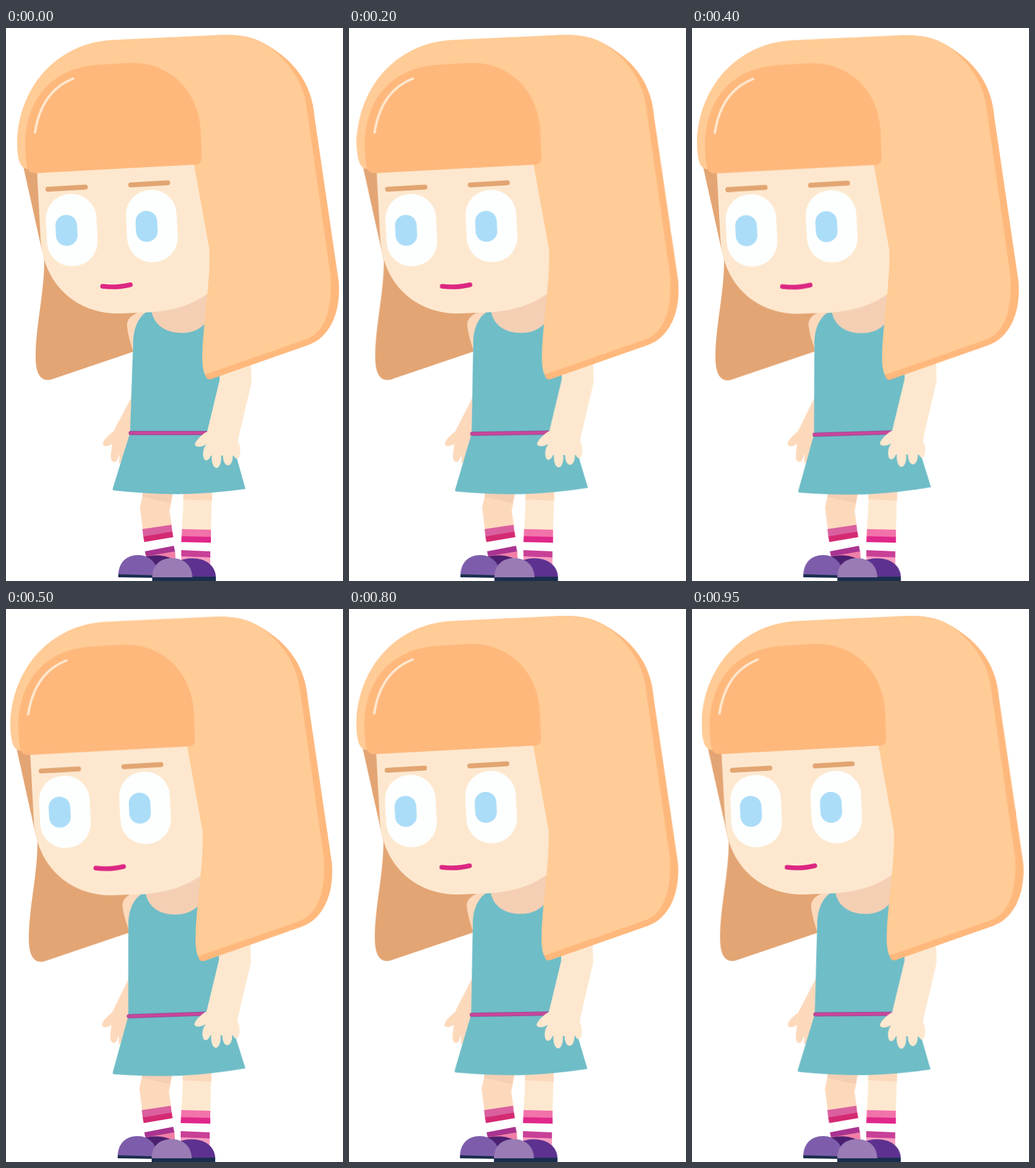
Animation of 546x895 px, one loop 1 s. Source, as an HTML page:

```html
<!DOCTYPE html>
<html lang="en">
<head>
<meta charset="utf-8">
<title>Girl swaying</title>
<style>
  html, body { margin: 0; width: 100%; height: 100%; overflow: hidden; background: #fff; }
  svg { display: block; width: 100%; height: 100%; }
  .skin { fill: #fde8cf; }
  .dim { fill: #fdd9bc; }
  .shade { fill: #f5cfb4; }
  .hair { fill: #ffcb96; }
  .fringe { fill: #ffb87c; }
  .back { fill: #e3a574; }
  .brow { stroke: #e2a572; stroke-width: 8; }
  .eye { fill: #fdfffe; }
  .iris { fill: #abddf8; }
  .line { fill: none; stroke-linecap: round; }
</style>
</head>
<body>
<svg viewBox="0 0 546 895">
  <g class="head">
    <path class="back" d="M28 224 L56 350 L62 376 C62 430 48 482 48 532 C48 558 55 573 73 569 L206 524 L310 489 L300 224 Z"/>
  </g>

  <g id="farArm" class="dim">
    <path d="M230 457 C208 460 196 468 196 482 C198 500 203 514 208 530 L214 590 L203 598 L174 653
      C166 659 157 667 157 673 C158 679 167 677 172 673 C172 680 169 690 170 697 C172 704 179 704 181 697 L184 690
      L183 705 L192 700 L240 600 L240 470 Z"/>
  </g>

  <g id="legs">
    <path class="dim" d="M222 740 L222 754 L217 776 L222 815 L269 808 L265 782 L271 750 Z"/>
    <path class="shade" d="M222 745 L221 759 L267 769 L271 745 Z"/>
    <path fill="#da5f9f" d="M221 811 L268 804 L269.500 816 L222.500 824 Z"/>
    <path fill="#d42a72" d="M222.500 823 L269.500 815 L271 824 L224 832 Z"/>
    <path fill="#a93490" d="M225 847 L272 838 L274 848 L227 856 Z"/>
    <path fill="#f07fa8" d="M227 855 L274 847 L275 865 L228 872 Z"/>

    <path class="skin" d="M288 745 L287 780 L285 812 L332 812 L334 745 Z"/>
    <path class="dim" d="M288 745 L287 763 L334 765 L334 745 Z"/>
    <path fill="#f272aa" d="M285 811 L332 812 V824 L284.500 823 Z"/>
    <path fill="#e0278a" d="M284.500 822.500 L332 823.500 V833 L284 832 Z"/>
    <path fill="#c94097" d="M284 845 L331 847 V857 L284 856 Z"/>
    <path fill="#f79bbf" d="M284 855 L331 857 V875 H284 Z"/>

    <path fill="#4c2070" d="M218 886 V858 C236 851 260 852 272 861 V886 Z"/>
    <path fill="#1a2e4e" d="M182 883 L245 885 V890 L182 889 Z"/>
    <path fill="#7d5dab" d="M182 884 C183 864 196 853 214 853 C232 853 245 865 247 886 Z"/>
    <path fill="#5d318f" d="M262 889 L275 864 C306 851 339 861 340 889 Z"/>
    <path fill="#1a2e4e" d="M237 888 H340 V895 H237 Z"/>
    <path fill="#9a7bb5" d="M237 889 C237 868 251 858 269 858 C287 858 301 868 302 889 Z"/>
  </g>

  <g id="torso">
    <path fill="#6fbdc7" d="M228 459 C212 470 206 490 206 512 C204 560 203 605 201 655 L173 745
      Q172 748 175 748.500 Q225 754 280 754.500 Q340 753 388 746 L361 650 L352 560 L345 455 Z"/>
    <path class="shade" d="M236 459 C240 481 259 493.500 285 493.500 C304 493.500 315 486 324 477 L345 477 L345 400 L236 400 Z"/>
    <path class="line" stroke="#9c3c90" stroke-width="6.600" d="M202 655.500 H330"/>
    <path class="line" stroke="#cb469c" stroke-width="4.600" d="M202 655.500 H330"/>
  </g>

  <g id="nearArm" class="skin">
    <path d="M346 520 V570 L326 653 C317 658 307 668 306 674 C308 680 318 678 324 674 L330 692 L373 692 L377 662 L398 573 L396 520 Z"/>
    <ellipse cx="326.500" cy="686" rx="7" ry="14" transform="rotate(10 326.500 686)"/>
    <ellipse cx="341" cy="696" rx="7.800" ry="16"/>
    <ellipse cx="359.500" cy="693" rx="8" ry="15"/>
    <ellipse cx="373" cy="682" rx="6.500" ry="15" transform="rotate(-5 373 682)"/>
  </g>

  <g class="head">
    <path class="skin" d="M50 228 L56 340 C60 415 115 464 185 462 L235 460 C275 457 305 447 332 426 L340 360 L310 212 Z"/>
    <path class="line brow" d="M68 261 L128.500 257.500 M202 254 L262 250.500"/>
    <g id="eyes"></g>
    <path class="line" stroke="#dc2783" stroke-width="7.500" d="M156.500 418 Q180 421 201.500 415.500"/>

    <path class="fringe" d="M345 11 C385 10 405 17 422 27 C470 55 496 92 500 145 L539 410 C543 456 527 500 490 513 L333 568
      Q326 571 323 563 L321 550 L400 500 Z"/>
    <path class="hair" d="M36 228 C22 229 18 210 18 182 C22 92 85 25 170 19.500 L340 11.500 C385 9 405 17 420 26
      C456 50 482 86 487 128 L526 402 C529 450 519 492 486 504 L322 561 C319 552 318 545 318 532
      C318 490 332 405 329.500 358 L304 218 Z"/>
    <path class="fringe" d="M31 188 C32 115 75 64 150 59.500 L200 56.500 C268 54 313 105 315.500 168 L317 211
      Q317 220 308 221 L47 235 Q36 235 34 224 Q31 208 31 188 Z"/>
    <path class="line" stroke="#fee8cf" stroke-width="4" d="M47 169 C53 130 70 97 109 82"/>
  </g>
</svg>
<script>
  const STEP = 50, LOOP = 1000;

  // time, head x, head y, body x, body y, torso angle
  const POSES = [
    [0, 0, 0, 0, 0, 0],
    [100, -2.8, 0, -1, 0, -0.45],
    [300, -8.3, 0, -1.8, 0, -1.4],
    [400, -10, 0.5, -1.6, 0.4, -1.7],
    [500, -11, 1.3, -1, 1, -1.9],
    [550, -10, 0.8, -1.2, 0.6, -1.7],
    [600, -9, 0.2, -1.5, 0.2, -1.5],
    [650, -8.3, 0, -1.8, 0, -1.4],
    [800, -6.2, 0, -2.2, 0, -0.9],
    [950, -2.5, 0, -1.7, 0, -0.4],
    [1000, 0, 0, 0, 0, 0]
  ];

  function poseAt(t) {
    const i = POSES.findIndex(p => p[0] > t);
    const a = POSES[i - 1], b = POSES[i];
    const k = (t - a[0]) / (b[0] - a[0]);
    return a.map((v, n) => v + (b[n] - v) * k);
  }

  const move = (x, y) => `translate(${x}px, ${y}px)`;
  const turn = (x, y, deg) => `${move(x, y)} rotate(${deg}deg) ${move(-x, -y)}`;

  const PARTS = {
    '.head': ([, hx, hy]) => move(hx, hy),
    '#torso': ([, , , x, y, r]) => `${move(x, y)} ${turn(280, 715, r)}`,
    '#farArm': ([, , , x, , r]) => `${move(x, 0)} ${turn(172, 690, r * 0.9)}`,
    '#nearArm': ([, , , x, , r]) => move(x, r),
    '#legs': ([, , , x]) => move(x, 0)
  };

  function tilted(cls, cx, cy, w, h, r) {
    return `<rect class="${cls}" x="${cx - w / 2}" y="${cy - h / 2}" width="${w}" height="${h}" rx="${r}"
      transform="rotate(-3 ${cx} ${cy})"/>`;
  }

  document.getElementById('eyes').innerHTML = [[106.5, 327], [236.3, 320.5]].map(([x, y]) =>
    tilted('eye', x, y, 82, 117, 40) + tilted('iris', x - 8.5, y + 0.5, 35, 50, 17)).join('');

  for (const [sel, pose] of Object.entries(PARTS)) {
    const frames = [];
    for (let t = 0; t < LOOP; t += STEP) {
      frames.push({ offset: t / LOOP, transform: pose(poseAt(t)), easing: 'step-end' });
    }
    frames.push({ offset: 1, transform: pose(poseAt(0)) });
    document.querySelectorAll(sel).forEach(el =>
      el.animate(frames, { duration: LOOP, iterations: Infinity }));
  }
</script>
</body>
</html>
```
